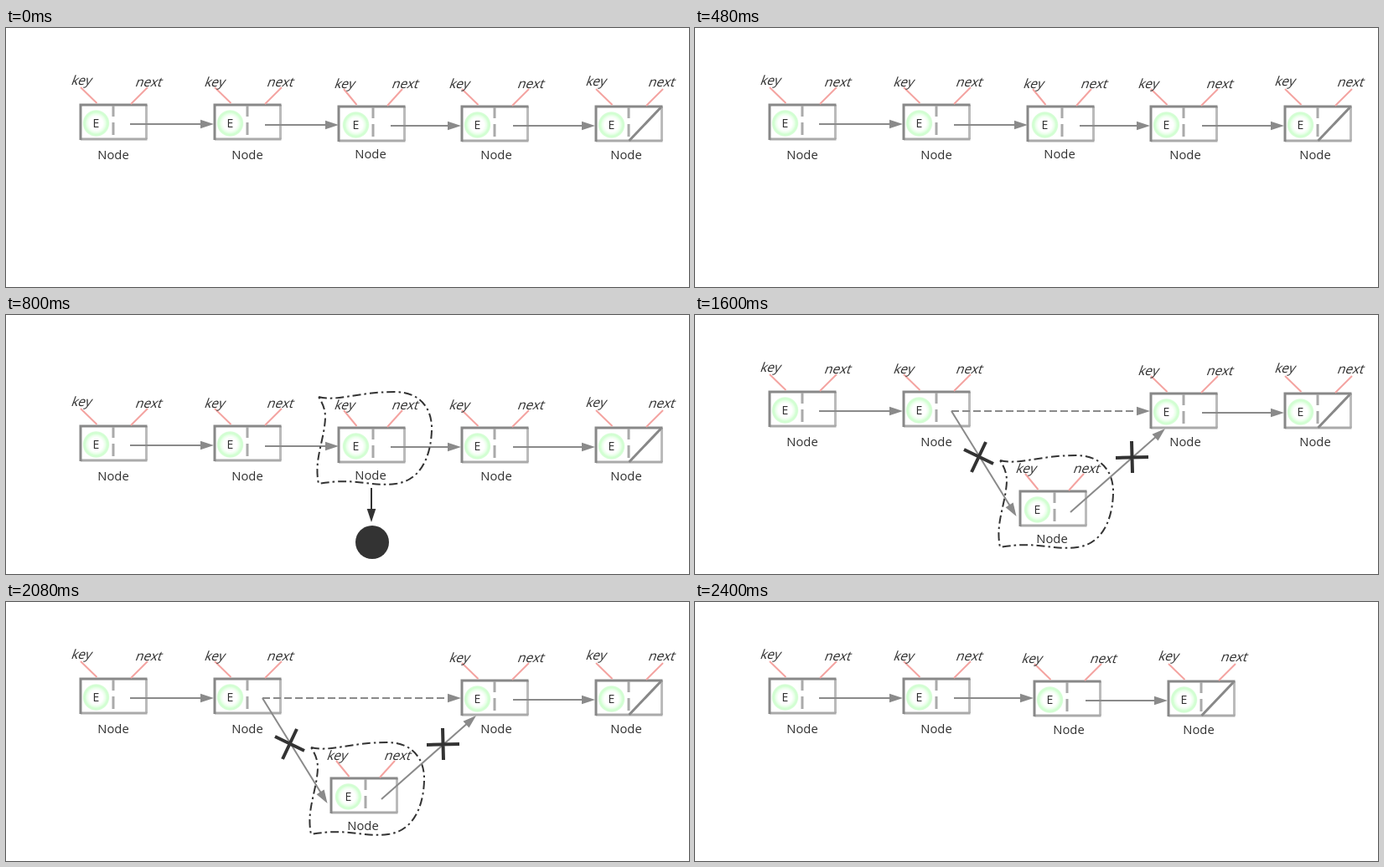
An HTML page for the animation above (3.2 s loop, 815 by 310 pixels).

```html
<!DOCTYPE html>
<html lang="en">
<head>
<meta charset="utf-8">
<title>Linked list removal</title>
<style>
html, body { margin: 0; width: 100%; height: 100%; overflow: hidden; background: #fff; }
svg { display: block; width: 815px; height: 310px; }
text { font-family: "Open Sans", "Noto Sans", sans-serif; fill: #303030; }
.label { font-size: 14.8px; text-anchor: middle; }
.tag { font-size: 15.5px; }
.elem { font-size: 14px; text-anchor: middle; }
path { fill: none; }
.dark { stroke: #888; stroke-width: 3; }
.pale { stroke: #aaa; stroke-width: 3; }
.side { stroke: #bbb; stroke-width: 3; }
.lead { stroke: #f4a3a0; stroke-width: 2; }
.link { stroke: #8a8a8a; stroke-width: 2; }
.cross { stroke: #333; stroke-width: 4; }
.lasso { stroke: #333; stroke-width: 2; stroke-dasharray: 10 4 2.5 4; }
</style>
</head>
<body>
<svg id="stage" viewBox="0 0 815 310">
  <defs>
    <radialGradient id="glow">
      <stop offset="0.5" stop-color="#fff"/>
      <stop offset="0.68" stop-color="#ecffec"/>
      <stop offset="0.84" stop-color="#d0ffd0"/>
      <stop offset="0.94" stop-color="#d6fdd6"/>
      <stop offset="1" stop-color="#f0fff0"/>
    </radialGradient>
  </defs>
</svg>
<script>
const stage = document.getElementById("stage");
const STEP = 800;

const path = (cls, d) => `<path class="${cls}" d="${d}"/>`;
const text = (cls, x, y, s) => `<text class="${cls}" x="${x}" y="${y}">${s}</text>`;
const tag = ([x, y], s) =>
  `<text class="tag" transform="translate(${x} ${y}) skewX(-20)">${s}</text>`;
const move = (dx, dy, body) => `<g transform="translate(${dx} ${dy})">${body}</g>`;

// x, y: top left corner; shift moves the inner parts and narrows the leads
function node(x, y, key, next, label, { shift = 0, last = false } = {}) {
  const r = x + 78.5, b = y + 41, mid = x + 39 + shift, cx = x + 18.5 + shift;
  return path("side", `M${r} ${y}V${b}`) +
    path("pale", `M${x} ${b}H${r + 1}`) +
    path("dark", `M${x} ${b + 1}V${y}H${r + 1}`) +
    path("pale", `M${mid} ${y + 1}v13m0 7v15`) +
    (last ? path("dark", `M${x + 39.5} ${b}L${r - 1} ${y + 1}`) : "") +
    `<circle cx="${cx}" cy="${y + 22}" r="16" fill="url(#glow)"/>` +
    text("elem", cx, y + 27, "E") +
    path("lead", `M${x + 3 * shift} ${y - 21}L${x + 19.5 + shift} ${y - 2}`) +
    path("lead", `M${x + 80 - 2 * shift} ${y - 21}L${x + 60 - shift} ${y - 1}`) +
    tag(key, "key") + tag(next, "next") + text("label", ...label, "Node");
}

function arrow(x1, y1, x2, y2, { color = "#8a8a8a", dash = "none" } = {}) {
  const len = Math.hypot(x2 - x1, y2 - y1);
  const deg = Math.atan2(y2 - y1, x2 - x1) * 180 / Math.PI;
  return `<g transform="translate(${x1} ${y1}) rotate(${deg})">` +
    `<path class="link" d="M0 0H${len - 14}" style="stroke:${color};stroke-dasharray:${dash}"/>` +
    `<polygon points="${len},0 ${len - 16},-5.3 ${len - 16},5.3" fill="${color}"/></g>`;
}

const first = node(89, 92, [77, 68], [153.5, 70], [128, 157]);
const second = node(249, 92, [236, 69.5], [310.5, 70], [288, 157]);
const third = node(397, 94, [391, 72], [459.5, 72], [435, 156], { shift: 2 });
const fourth = node(544, 94, [528, 71.5], [609.5, 72], [585, 157]);
const fifth = node(704, 94, [691, 69], [765.5, 70], [740, 157], { last: true });

const headLink = arrow(148, 115, 248, 115);
const tailLink = arrow(605, 117, 703, 117);
const row = first + second + third + fourth + fifth + headLink +
  arrow(309, 116, 397, 116) + arrow(459, 117, 543, 117) + tailLink;

const lasso = path("lasso",
  "M373 57C394 63 420 51 464 51C493 51 509 70 508 97" +
  "C507 128 495 157 465 161C435 165 418 153 373 161" +
  "C367 132 380 109 381 82C381 72 378 65 373 57");

const scenes = [
  row,
  move(0, 41, row + lasso) +
    arrow(436, 207, 436, 248, { color: "#333" }) +
    `<circle cx="437" cy="272" r="20" fill="#333"/>`,
  first + second + fourth + fifth + headLink + tailLink +
    move(-9, 117, third + lasso) +
    arrow(306, 115, 543, 115, { dash: "9 4" }) +
    arrow(306, 115, 383.5, 241) + arrow(448, 236, 561, 136) +
    path("cross", "M321 161L356 178M347 152L330 188M502 171L541 170M521 151L522 189"),
  first + second +
    node(405, 95, [389, 73], [470.5, 73], [446, 158]) +
    node(565, 95, [552, 70], [626.5, 71], [601, 158], { last: true }) +
    headLink + arrow(309, 115, 404, 115) + arrow(466, 118, 564, 118)
].map(body => {
  const g = document.createElementNS("http://www.w3.org/2000/svg", "g");
  g.innerHTML = body;
  stage.append(g);
  return g;
});

function draw(ms) {
  const now = Math.floor(ms / STEP) % scenes.length;
  scenes.forEach((g, i) => g.style.display = i === now ? "" : "none");
}

const start = performance.now();
function tick() {
  draw(performance.now() - start);
  requestAnimationFrame(tick);
}
tick();
</script>
</body>
</html>
```
